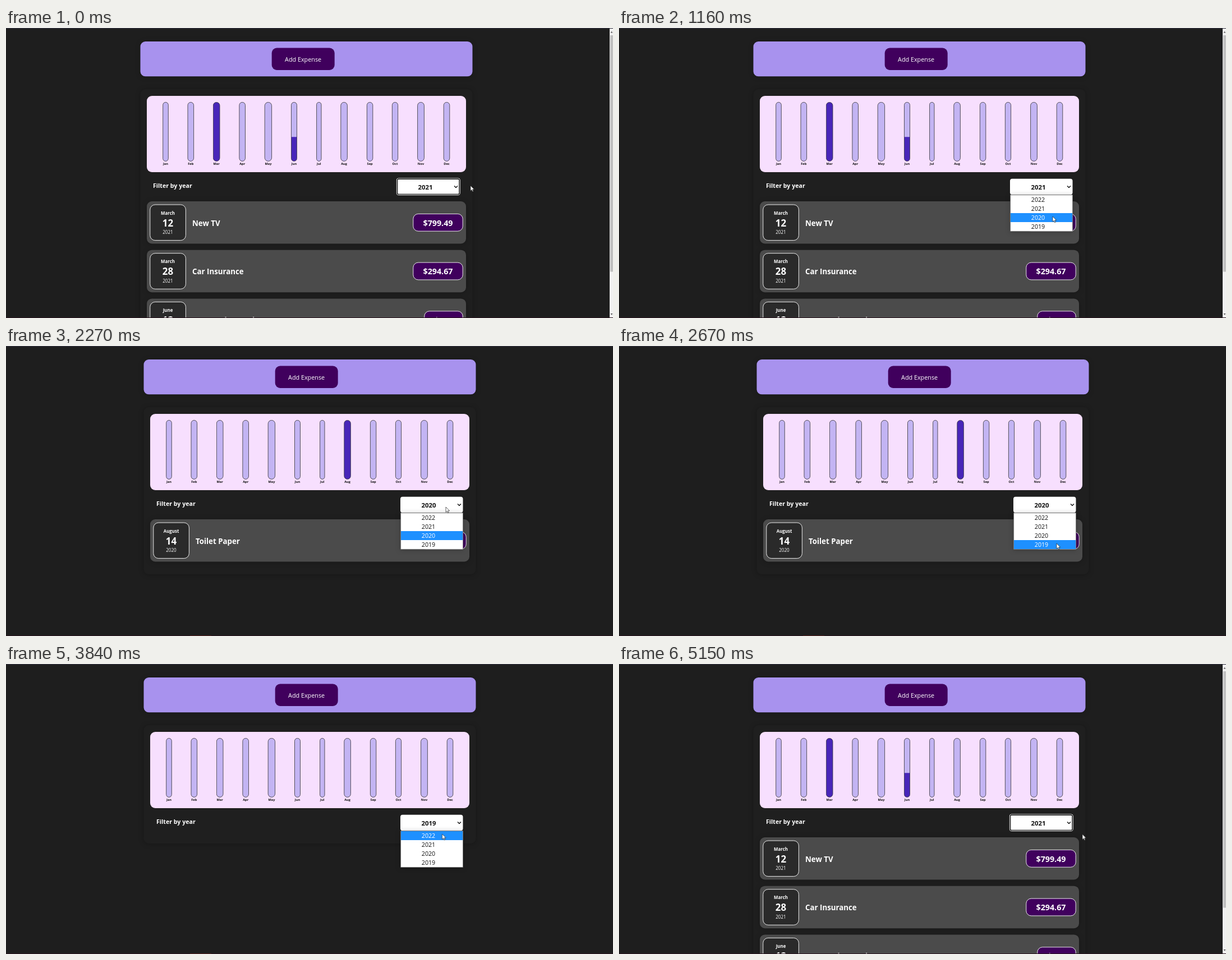
An HTML page for the animation above (5980 ms loop, 1082 by 517 pixels).

```html
<!DOCTYPE html>
<html lang="en">
<head>
<meta charset="utf-8">
<title>Expense tracker</title>
<style>
  html, body { margin: 0; width: 100%; height: 100%; overflow: hidden; background: #1e1e1e; }
  svg { display: block; font-family: "Open Sans", "Noto Sans", sans-serif; }
  text { fill: #fff; }
  .bold { font-weight: 700; }
  .mid { text-anchor: middle; }
  .dark { fill: #111; }
  .card { filter: drop-shadow(0 1px 4px rgba(0, 0, 0, .25)); }

  .page, .list, .y2021, .y2020, .y2019, .none2019, .away, .ring, .menu, .menu-at, .hot {
    animation: 5.98s step-end infinite;
  }
  .page { animation-name: shift; }
  .y2021 { animation-name: y2021; }
  .list.y2020 { animation-name: list2020; }
  .y2020 { animation-name: y2020; }
  .y2019 { animation-name: y2019; }
  .none2019 { animation-name: none2019; }
  .away { animation-name: away; }
  .ring { animation-name: ring; }
  .menu { animation-name: menu; }
  .menu-at { animation-name: menu-at; }
  .hot { animation-name: hot; }
  .fill { transform-box: fill-box; transform-origin: bottom; }
  .fill.in21 { animation: fill21 5.98s ease-out infinite; }
  .fill.in20 { animation: fill20 5.98s ease-out infinite; }
  .cursor { animation: cursor 5.98s linear infinite; }

  @keyframes shift {
    0%, 72.4% { transform: none; }
    24.07% { transform: translateX(6px); }
  }
  @keyframes menu-at {
    0%, 73.57% { transform: none; }
    27.92% { transform: translateX(6px); }
  }
  @keyframes y2021 {
    0%, 72.4% { visibility: visible; }
    24.07% { visibility: hidden; }
  }
  @keyframes away {
    0%, 72.4% { visibility: hidden; }
    24.07% { visibility: visible; }
  }
  @keyframes list2020 {
    0%, 50.1% { visibility: hidden; }
    24.07% { visibility: visible; }
  }
  @keyframes y2020 {
    0%, 49.32% { visibility: hidden; }
    24.07% { visibility: visible; }
  }
  @keyframes y2019 {
    0%, 72.4% { visibility: hidden; }
    49.32% { visibility: visible; }
  }
  @keyframes none2019 {
    0%, 72.4% { visibility: hidden; }
    50.1% { visibility: visible; }
  }
  @keyframes ring {
    0%, 24.07%, 49.32%, 72.4% { visibility: visible; }
    10.19%, 37.95%, 60.69% { visibility: hidden; }
  }
  @keyframes menu {
    0%, 27.92%, 49.32%, 73.57% { visibility: hidden; }
    10.19%, 37.95%, 60.69% { visibility: visible; }
  }
  @keyframes hot {
    0%, 67.5% { clip-path: inset(16px 0 32px); }
    17.2%, 27.92% { clip-path: inset(32px 0 16px); }
    41.8% { clip-path: inset(48px 0 0); }
    63% { clip-path: inset(0 0 48px); }
  }
  @keyframes fill21 {
    0%, 24.06% { transform: none; }
    24.07%, 27.91% { transform: scaleY(.32); }
    27.92%, 72.1% { transform: scaleY(0); }
    77.1%, 100% { transform: none; }
  }
  @keyframes fill20 {
    0%, 24.06% { transform: scaleY(0); }
    24.07%, 27.91% { transform: scaleY(.686); }
    27.92%, 50.22% { transform: none; }
    55.23%, 100% { transform: scaleY(0); }
  }
  @keyframes cursor {
    0%, 1.5% { transform: translate(828px, 281px); }
    7.8%, 10.2% { transform: translate(785px, 285px); }
    13.7% { transform: translate(777px, 296px); }
    19.4%, 24.06% { transform: translate(773px, 336px); }
    24.07%, 27.9% { transform: translate(773.5px, 320px); }
    34.4%, 38% { transform: translate(784px, 287px); }
    44.6%, 49.3% { transform: translate(780px, 352px); }
    50.5% { transform: translate(780px, 346px); }
    58.3%, 60.7% { transform: translate(782px, 286px); }
    64.2% { transform: translate(777.5px, 303px); }
    68.9%, 72.4% { transform: translate(777px, 321px); }
    81.4% { transform: translate(822px, 306px); }
    86.1%, 100% { transform: translate(826px, 303.5px); }
  }
</style>
</head>
<body>
<svg id="stage" width="1082" height="517" viewBox="0 0 1082 517"></svg>
<script>
  const rect = (x, y, w, h, r, fill, extra = "") =>
    `<rect x="${x}" y="${y}" width="${w}" height="${h}" rx="${r}" fill="${fill}" ${extra}/>`;

  // Text is placed by the middle of its capitals.
  const text = (str, x, y, size, cls = "") =>
    `<text x="${x}" y="${y + size * 0.357}" font-size="${size}" class="${cls}">${str}</text>`;

  const months = "Jan Feb Mar Apr May Jun Jul Aug Sep Oct Nov Dec".split(" ");
  const centers = [284.5, 329.3, 375.2, 421.2, 467.4, 513.5, 557.8, 602.6, 648.6, 693.5, 739.5, 785.5];
  const widths = [9.6, 10.6, 11.6, 10.6, 12.4, 10, 8.4, 11.6, 10.4, 10.2, 11.8, 10.6];
  const fills = { Mar: ["in21", 1], Jun: ["in21", 0.411], Aug: ["in20", 1] };
  const barTop = 132.4, barHeight = 105;

  function bar(name, i) {
    const w = widths[i], x = centers[i] - w / 2;
    const shape = (fill, extra) => rect(x, barTop, w, barHeight, w / 2, fill, extra);
    let level = "";
    if (fills[name]) {
      const [cls, share] = fills[name], h = barHeight * share;
      level = `<clipPath id="${name}">${shape("#000")}</clipPath><g clip-path="url(#${name})">` +
        rect(x, barTop + barHeight - h, w, h, 0, "#4826b9", `class="fill ${cls}"`) + "</g>";
    }
    return shape("#c3b4f3") + level +
      shape("none", 'stroke="#313131" stroke-width=".8"') +
      text(name, centers[i], 242.2, 5.7, "bold mid dark");
  }

  function expense(y, month, day, year, title, price, priceWidth) {
    const left = 814.2 - priceWidth, line = 'stroke="#fff" stroke-width=".9"';
    return rect(251, y, 569, 75.5, 9, "#4b4b4b", 'class="card"') +
      rect(256.8, y + 6, 63.6, 63.6, 9, "#2a2a2a", line) +
      text(month, 288.5, y + 20.7, 7.9, "bold mid") +
      text(day, 288.5, y + 38.6, 16.9, "bold mid") +
      text(year, 288.5, y + 55, 8.1, "mid") +
      text(title, 332, y + 38.8, 13.3, "bold") +
      rect(left, y + 22.4, priceWidth, 30.8, 9, "#40005d", line) +
      text(price, left + priceWidth / 2, y + 38.6, 14.3, "bold mid");
  }

  const panel = (h, cls) => rect(239.5, 109, 592, h, 9, "#1f1f1f", `class="card ${cls}"`);
  const years = cls => [2022, 2021, 2020, 2019]
    .map((year, i) => text(year, 747, 306.6 + 16 * i, 10.7, "mid " + cls)).join("");
  const chosen = year => `<g class="y${year}">${text(year, 747.4, 283.8, 11.4, "bold mid dark")}</g>`;

  const chart = rect(251, 121, 569, 136, 9, "#f7dffe") + months.map(bar).join("");

  const select = rect(697, 268.8, 111.5, 28.4, 4, "#fff") +
    `<g class="ring">${rect(696.4, 268, 112.8, 29.6, 3, "none", 'stroke="#fff"')}` +
    rect(697.6, 269.2, 110.4, 27.2, 2, "none", 'stroke="#101010" stroke-width="1.4"') + "</g>" +
    [2021, 2020, 2019].map(chosen).join("") +
    '<path d="M799 281.6l3 3 3-3" fill="none" stroke="#111" stroke-width="1.4"/>';

  const page = panel(500, "y2021") + panel(298, "list y2020") + panel(211, "none2019") +
    rect(239.5, 24, 592, 62.3, 9, "#a892ee", 'class="card"') +
    rect(473.7, 35.5, 112, 39.5, 9, "#40005d") +
    text("Add Expense", 529.6, 55.8, 10.8, "mid") +
    chart + text("Filter by year", 262, 281.2, 10.65, "bold") + select +
    `<g class="list y2021">` +
    expense(309, "March", 12, 2021, "New TV", "$799.49", 88.4) +
    expense(395.7, "March", 28, 2021, "Car Insurance", "$294.67", 88.4) +
    expense(482.4, "June", 12, 2021, "New Desk (Wooden)", "$450", 68.4) + "</g>" +
    `<g class="list y2020">` +
    expense(309, "August", 14, 2020, "Toilet Paper", "$94.12", 80.2) + "</g>";

  const scrollbar = `<g class="y2021">${rect(1076, 1, 6, 516, 0, "#f1f1f1")}` +
    rect(1077, 13, 5, 421.5, 0, "#c1c1c1") +
    '<path d="M1077.5 8.5l2-2.5 2 2.5zM1077.5 509l2 2.5 2-2.5z" fill="#505050"/></g>';

  const menu = `<g class="menu-at"><g class="menu">` +
    rect(697.7, 297.7, 110.8, 64.6, 0, "#fff", 'stroke="#777" stroke-width=".8" class="card"') +
    years("dark") +
    `<g class="hot">${rect(698, 298, 110.2, 64, 0, "#1e90ff")}${years("")}</g></g></g>`;

  const edges = rect(0, 0, 1082, 1, 0, "#2f2f3d") + rect(0, 516, 1082, 1, 0, "#2b1520") +
    rect(328, 516, 38, 1, 0, "#55201f", 'class="away"');

  const cursor = '<path class="cursor" d="M0 0v9.4l2.2-2 1.5 3.4 1.5-.7-1.5-3.3h3z" ' +
    'fill="#fff" stroke="#222" stroke-width=".7"/>';

  document.getElementById("stage").innerHTML =
    `<g class="page">${page}</g>` + scrollbar + edges + menu + cursor;
</script>
</body>
</html>
```
